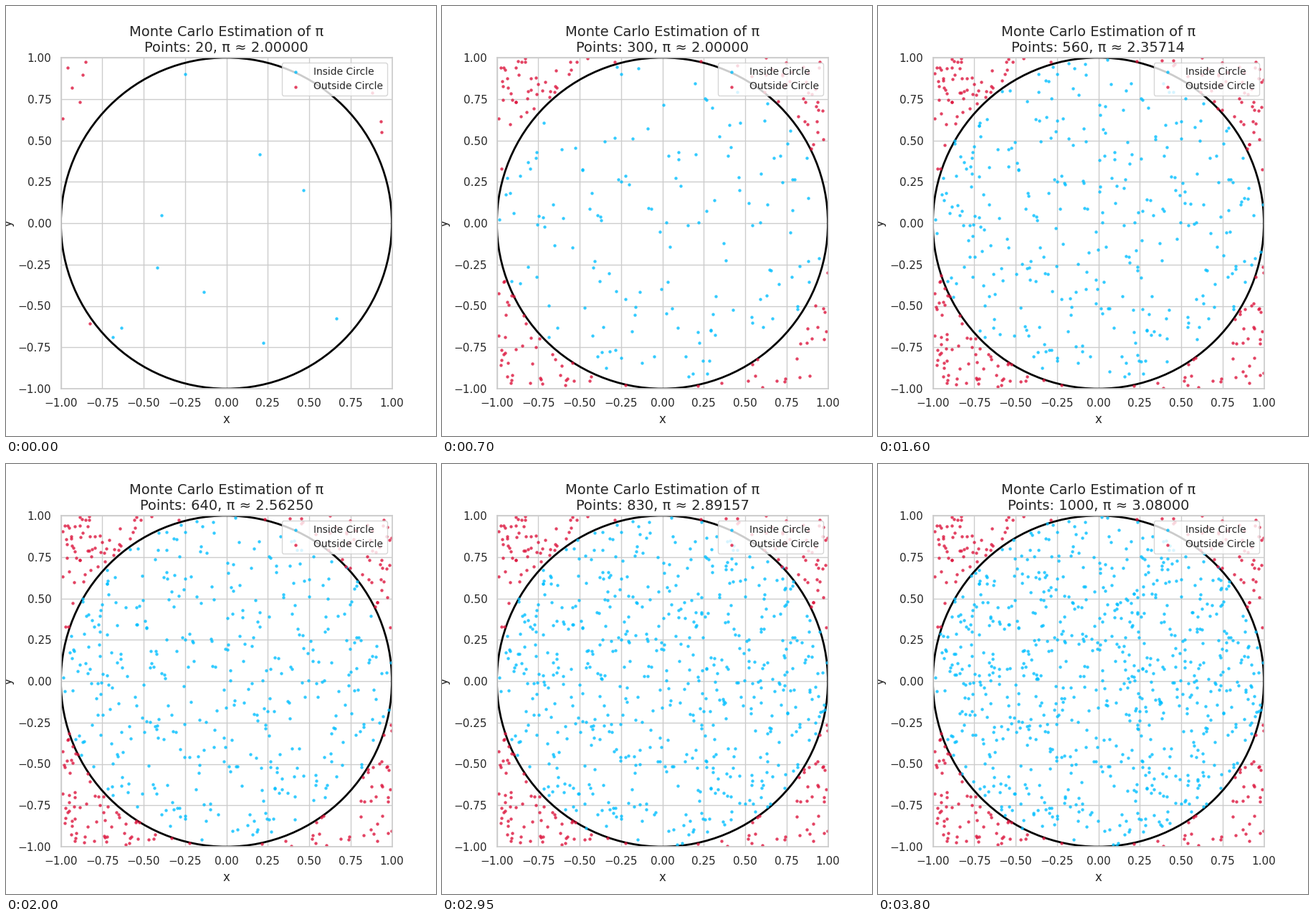
A matplotlib script that plays this animation: 600x600 px, repeating every 5000 ms.

```python
import numpy as np
import matplotlib.pyplot as plt
from matplotlib.animation import FuncAnimation

FRAMES, INTERVAL = 100, 50
N_INSIDE, N_OUTSIDE, STEP = 770, 230, 10

INK, RULE = "0.15", "0.8"
plt.rcParams.update({
    "font.family": "DejaVu Sans",
    "text.color": INK, "axes.labelcolor": INK,
    "xtick.color": INK, "ytick.color": INK,
    "axes.edgecolor": RULE, "axes.linewidth": 1.25, "axes.axisbelow": True,
    "axes.grid": True, "grid.color": RULE, "grid.linewidth": 1,
    "axes.labelsize": 12, "xtick.labelsize": 11, "ytick.labelsize": 11,
    "xtick.major.size": 6, "ytick.major.size": 6,
    "xtick.bottom": False, "ytick.left": False,
})

# Uniform samples of the square, split by the unit circle
samples = np.random.RandomState(42).uniform(-1, 1, (4000, 2))
hit = (samples ** 2).sum(axis=1) <= 1
inside = samples[hit][:N_INSIDE]
outside = samples[~hit][:N_OUTSIDE]

fig, ax = plt.subplots(figsize=(6, 6), dpi=100)
ax.set_aspect("equal")
ax.set(xlim=(-1, 1), ylim=(-1, 1), xlabel="x", ylabel="y")
ticks = np.linspace(-1, 1, 9)
ax.set_xticks(ticks)
ax.set_yticks(ticks)
ax.add_patch(plt.Circle((0, 0), 1, fill=False, color="black", linewidth=2))


def make_dots(color, label):
    return ax.scatter([], [], s=10, color=color, alpha=0.8, linewidths=0, label=label)


inside_dots = make_dots("deepskyblue", "Inside Circle")
outside_dots = make_dots("crimson", "Outside Circle")
ax.legend(loc="upper right", fontsize=10)
title = ax.set_title("", fontsize=14)


def update(frame):
    # Both groups grow by the same step until each runs out
    shown = STEP * (frame + 1)
    n_in, n_out = min(shown, N_INSIDE), min(shown, N_OUTSIDE)
    inside_dots.set_offsets(inside[:n_in])
    outside_dots.set_offsets(outside[:n_out])
    n = n_in + n_out
    title.set_text(f"Monte Carlo Estimation of π\nPoints: {n}, π ≈ {4 * n_in / n:.5f}")
    return inside_dots, outside_dots, title


anim = FuncAnimation(fig, update, frames=FRAMES, interval=INTERVAL,
                     repeat=True, repeat_delay=0)
plt.show()
```
